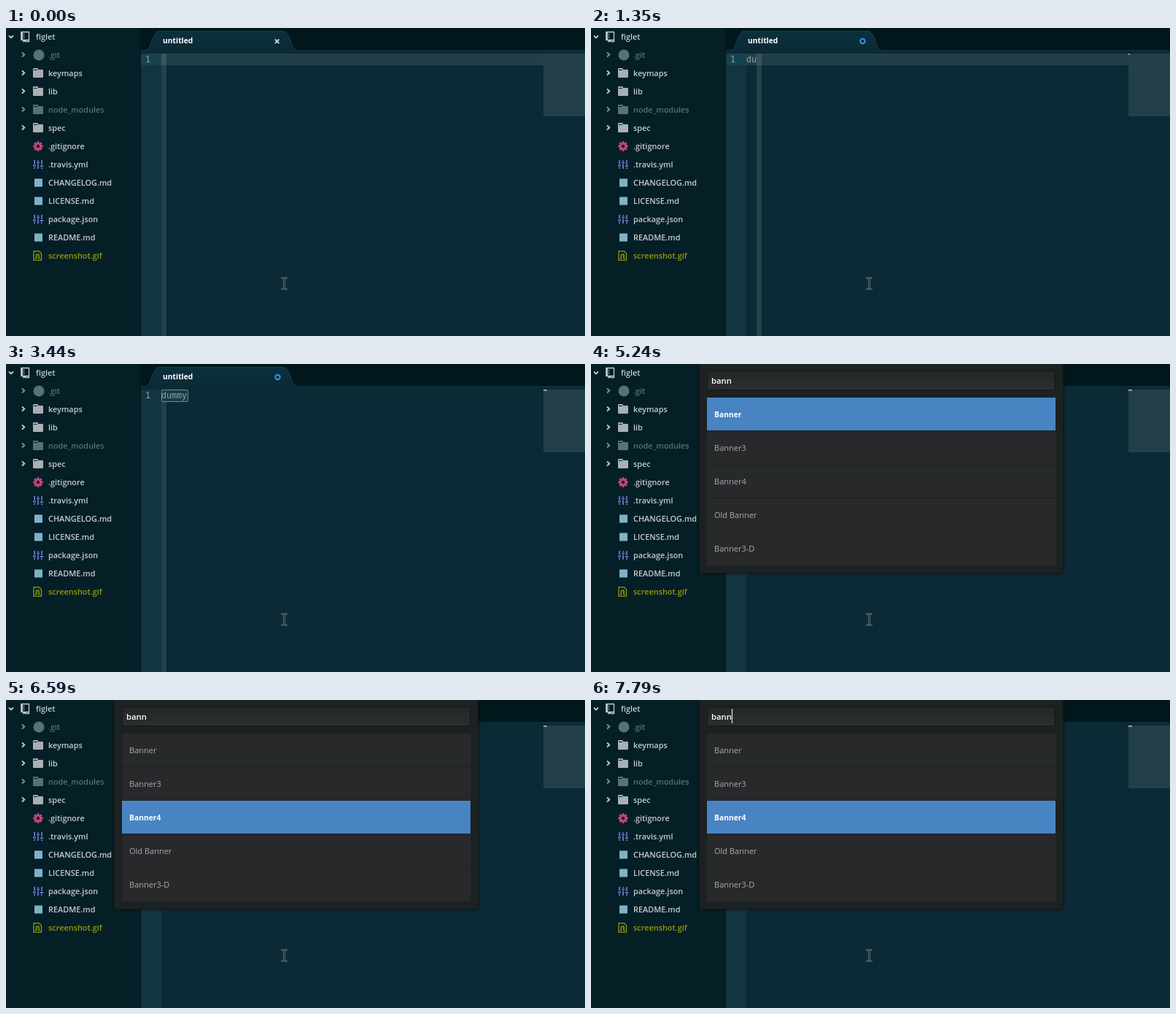
An HTML page that plays this animation: 794x422 px, repeating every 8 s.

```html
<!DOCTYPE html>
<html lang="en">
<head>
<meta charset="utf-8">
<title>Editor with font picker</title>
<style>
  html, body { margin: 0; width: 100%; height: 100%; overflow: hidden; background: #0b2a35; }
  svg { display: block; width: 794px; height: 422px; }
  text { font: 500 11px "Open Sans", "Noto Sans", sans-serif; white-space: pre; }
  #tree text { font-weight: 600; font-size: 10.9px; }
  .code { font: 11.63px "DejaVu Sans Mono", monospace; fill: #93a1a1; }
  .bold, #list .bold { font-weight: 700; font-size: 10.3px; fill: #fff; }
  .query { font-weight: 600; font-size: 11.3px; fill: #fff; }
</style>
</head>
<body>
<svg id="stage" viewBox="0 0 794 422" xmlns="http://www.w3.org/2000/svg">
  <defs>
    <linearGradient id="tab" x2="0" y2="1"><stop stop-color="#0b303e"/><stop offset="1" stop-color="#0b2a35"/></linearGradient>
    <linearGradient id="field" x2="0" y2="1"><stop stop-color="#252628"/><stop offset="1" stop-color="#2d2e30"/></linearGradient>
    <filter id="shadow" x="-5%" y="-5%" width="110%" height="110%">
      <feDropShadow dx="0" dy="0" stdDeviation="2" flood-color="#000" flood-opacity=".5"/>
    </filter>
    <path id="beam" d="M378.500 342.500Q381.500 342.500 381.500 345.500V354.500Q381.500 357.500 378.500 357.500M384.500 342.500Q381.500 342.500 381.500 345.500M384.500 357.500Q381.500 357.500 381.500 354.500"/>
  </defs>

  <rect width="794" height="422" fill="#0b2a35"/>
  <rect x="185" width="609" height="30" fill="#02171b"/>
  <rect x="185" y="30" width="609" height="1" fill="#0a3341"/>
  <path d="M192 31C200 28 200 5 210 4.500H380C390 5 390 28 398 31" fill="url(#tab)" stroke="#0f4256"/>
  <text class="bold" x="215" y="21">untitled</text>
  <path id="close" d="M369 15.500L374.500 21M374.500 15.500L369 21" stroke="#c5cdd0" stroke-width="1.800"/>
  <circle id="modified" cx="372.500" cy="18" r="3.200" fill="none" stroke="#3294ee" stroke-width="2"/>

  <rect x="185" y="35" width="28" height="387" fill="#133541"/>
  <g id="lineMark">
    <rect x="185" y="35" width="28" height="16" fill="#17424f"/>
    <rect x="213" y="35" width="524" height="16" fill="#223f49"/>
  </g>
  <rect id="column" y="35" width="7" height="387" fill="#fff" fill-opacity=".1"/>
  <rect x="737" y="35" width="57" height="86" fill="#233f49"/>
  <rect id="mini" x="737" y="35" height="2" fill="#93a1a1"/>
  <text class="code" x="191" y="47">1</text>
  <rect id="selection" x="213.500" y="35.500" width="36" height="16" rx="1" fill="#1a3a45" stroke="#6f8c96"/>
  <text id="typed" class="code" x="213" y="47"></text>
  <rect id="caret" y="35" width="1" height="16" fill="#93a1a1"/>

  <g fill="none" stroke-linecap="round">
    <use href="#beam" stroke="#6c7c83" stroke-width="2.600"/>
    <use href="#beam" stroke="#10232b"/>
  </g>

  <rect width="184" height="422" fill="#051f27"/>
  <rect x="184" width="1" height="422" fill="#02151a"/>
  <g id="tree"></g>

  <g id="picker">
    <rect x="148.500" y="-6" width="499" height="292.500" rx="2" fill="#1f2021" stroke="#161718" filter="url(#shadow)"/>
    <rect x="159.500" y="9.500" width="477" height="26" rx="2" fill="url(#field)" stroke="#131415"/>
    <text class="query" x="165" y="27">bann</text>
    <rect id="queryCaret" x="193" y="12" width="1" height="20" fill="#fff"/>
    <g id="list"></g>
  </g>
</svg>
<script>
const $ = id => document.getElementById(id);

function add(parent, tag, attrs, text) {
  const el = document.createElementNS("http://www.w3.org/2000/svg", tag);
  for (const key in attrs) el.setAttribute(key, attrs[key]);
  if (text) el.textContent = text;
  parent.append(el);
  return el;
}

const LIGHT = "#c4cccf", DIM = "#5a7077", OLIVE = "#949c10";

// Icons are drawn around the centre of their row.
const icons = {
  repo(g) {
    add(g, "path", { d: "M21 -6.500H31.500V4.500H21Z M28 6.500H31.500V4", fill: "none", stroke: LIGHT, "stroke-width": 1.3 });
    add(g, "path", { d: "M20.500 -7H23V4H20.500Z M23.500 4H27.500V8L25.500 6.500L23.500 8Z", fill: LIGHT });
    add(g, "path", { d: "M24.500 -4.500V3", stroke: LIGHT, "stroke-dasharray": "1.500 1" });
  },
  mark(g) { add(g, "circle", { cx: 45, r: 7.5, fill: DIM }); },
  folder(g, color) {
    add(g, "path", { d: "M37 -6Q37 -7 38 -7H43Q44 -7 44 -6V-5H50Q51 -5 51 -4V5Q51 6 50 6H38Q37 6 37 5Z", fill: color });
    add(g, "path", { d: "M38 -4.500H43", stroke: "#06232b" });
  },
  gear(g) {
    const color = "#c44580";
    add(g, "circle", { cx: 44, r: 3.7, fill: "none", stroke: color, "stroke-width": 3 });
    for (let a = 0; a < 360; a += 45)
      add(g, "rect", { x: 42.6, y: -6.8, width: 2.8, height: 2.6, fill: color, transform: `rotate(${a} 44 0)` });
  },
  sliders(g) {
    [[39, 1.5], [44, -2.5], [49, 2]].forEach(([x, y]) =>
      add(g, "path", { d: `M${x} -6V${y - 2}M${x} ${y + 2}V6M${x - 2} ${y}H${x + 2}`, stroke: "#6f77c8", "stroke-width": 1.8 }));
  },
  doc(g) { add(g, "rect", { x: 39, y: -5.5, width: 11, height: 11, fill: "#7fb2c6" }); },
  image(g) {
    add(g, "path", { d: "M38 -6.200H45.500L48.500 -3V6.200H38Z", fill: "none", stroke: OLIVE, "stroke-width": 1.3 });
    add(g, "path", { d: "M41.500 4V-.500Q41.500 -2 43.200 -2Q45 -2 45 -.500V4M40 3.500H42M44.500 3.500H46.500", fill: "none", stroke: OLIVE, "stroke-width": 1.6 });
  }
};

[
  ["figlet", "repo"],
  [".git", "mark", DIM],
  ["keymaps", "folder"],
  ["lib", "folder"],
  ["node_modules", "folder", DIM],
  ["spec", "folder"],
  [".gitignore", "gear"],
  [".travis.yml", "sliders"],
  ["CHANGELOG.md", "doc"],
  ["LICENSE.md", "doc"],
  ["package.json", "sliders"],
  ["README.md", "doc"],
  ["screenshot.gif", "image", OLIVE]
].forEach(([name, icon, color = LIGHT], row) => {
  const g = add($("tree"), "g", { transform: `translate(0 ${12 + row * 25})` });
  if (row < 6) {
    const d = row ? "M22 -3.500L25.300 -.500L22 2.500" : "M4 -1.500L7 1.500L10 -1.500";
    add(g, "path", { d, fill: "none", stroke: row === 1 || row === 4 ? "#80929a" : LIGHT, "stroke-width": 1.8 });
  }
  icons[icon](g, icon === "folder" && color === LIGHT ? "#a9b0b2" : color);
  add(g, "text", { x: row ? 58 : 41, y: 4, fill: color }, name);
});

const items = ["Banner", "Banner3", "Banner4", "Old Banner", "Banner3-D"].map((name, i) => {
  const y = 46 + i * 46;
  const back = add($("list"), "rect", { x: 159, y, width: 478, height: i < 4 ? 45 : 46 });
  const label = add($("list"), "text", { x: 169, y: y + 27, fill: "#a9acaf" }, name);
  return { back, label };
});

// Each step holds until the next: [start, value].
const LOOP = 8000;
const letters = [[0, 0], [600, 1], [1200, 2], [1650, 3], [1800, 4], [2400, 5]];
const caretOn = [[0, 0], [150, 1], [600, 1], [1050, 0], [1200, 1], [1350, 0], [1650, 1], [2250, 0], [2400, 1], [2540, 0], [2990, 1], [3440, 0]];
const queryOn = [[0, 0], [5390, 1], [5840, 0], [6290, 1], [6590, 0], [7040, 1], [7490, 0], [7790, 1]];
const chosen = [[0, 0], [6290, 1], [6590, 2], [6890, 3], [7790, 2]];

const at = (steps, t) => steps.filter(step => step[0] <= t).pop()[1];
const show = (id, on) => $(id).setAttribute("visibility", on ? "visible" : "hidden");

function render(t) {
  const count = at(letters, t);
  const selected = t >= 3440;
  const picking = t >= 5240;
  const x = selected ? 213 : 213 + count * 7;

  $("typed").textContent = "dummy".slice(0, count);
  $("mini").setAttribute("width", count);
  $("column").setAttribute("x", x);
  $("caret").setAttribute("x", x);
  show("caret", at(caretOn, t));
  show("column", !picking);
  show("lineMark", !selected);
  show("selection", selected);
  show("close", t < 900);
  show("modified", t >= 900);

  $("picker").style.display = picking ? "" : "none";
  show("queryCaret", at(queryOn, t));
  const active = at(chosen, t);
  items.forEach(({ back, label }, i) => {
    back.setAttribute("fill", i === active ? "#4883c2" : "#27292b");
    label.setAttribute("class", i === active ? "bold" : "");
  });
}

const start = performance.now();
function tick() {
  render((performance.now() - start) % LOOP);
  requestAnimationFrame(tick);
}
tick();
</script>
</body>
</html>
```
